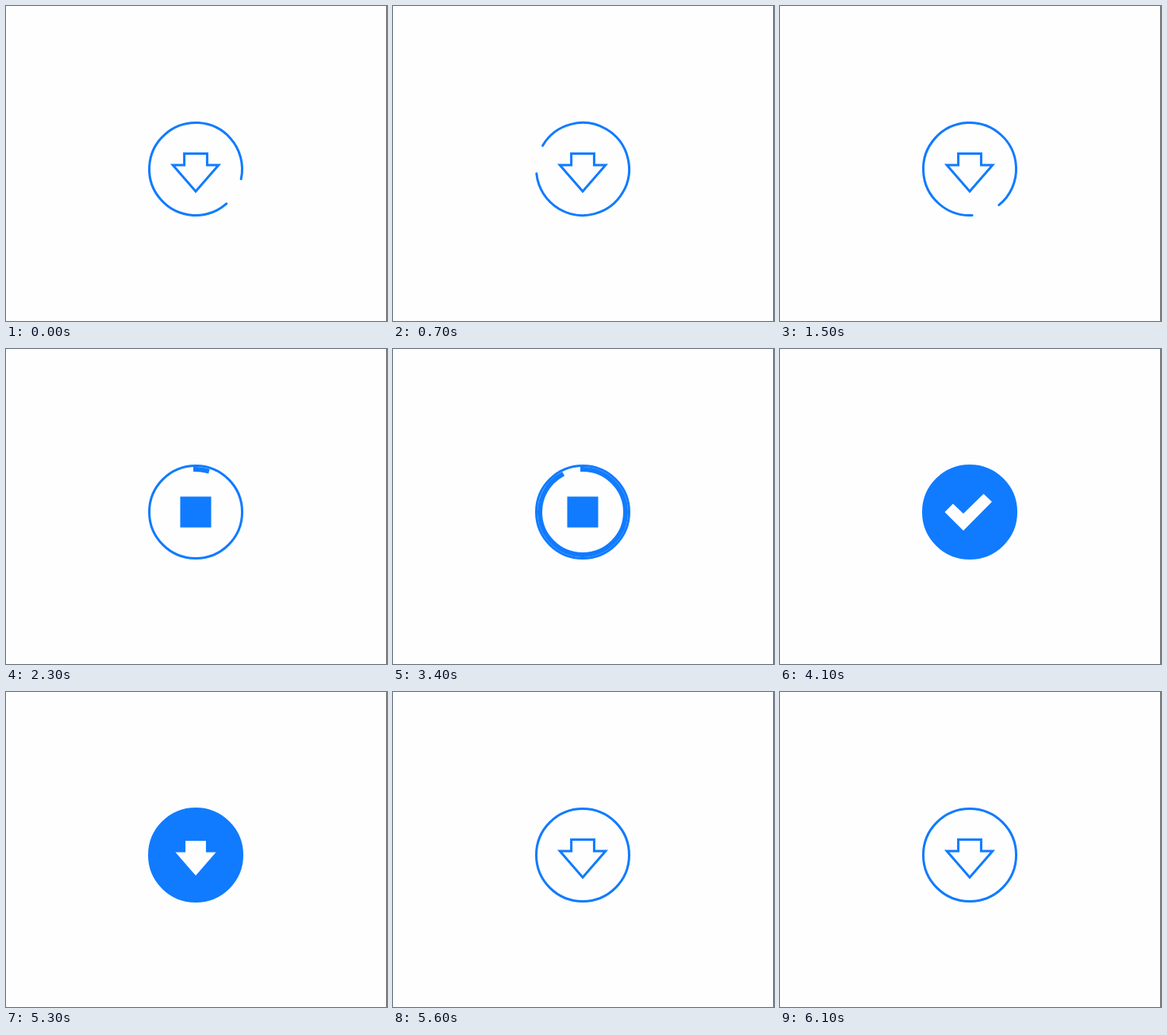
Write an HTML page with a canvas that moves like this. It is 480 px wide and 398 px high and loops after 6200 ms.

```html
<!DOCTYPE html>
<html lang="en">
<head>
<meta charset="utf-8">
<title>Download button</title>
<style>
  html, body { margin: 0; width: 100%; height: 100%; overflow: hidden; background: #fefefe; }
  canvas { display: block; }
</style>
</head>
<body>
<canvas id="stage" width="480" height="398"></canvas>
<script>
const LOOP = 6200, STEP = 100;
const RGB = '16,123,255', BLUE = `rgb(${RGB})`, WHITE = '#fefefe';
const CX = 239, CY = 206, SEG = 14.4;
const ctx = document.getElementById('stage').getContext('2d');
const rad = deg => deg * Math.PI / 180;
const clamp = v => Math.max(0, Math.min(1, v));

const ARROW = [[-1, 0], [1, 0], [1, 1], [2, 1], [0, 3.3], [-2, 1], [-1, 1]]
  .map(([x, y]) => [CX + x * SEG, 186.6 + y * SEG]);
const TICK = [[207.5, 206], [218, 195.5], [231, 208], [256.5, 183], [267, 193], [231, 229.5]];

function polygon(points) {
  ctx.beginPath();
  points.forEach(([x, y]) => ctx.lineTo(x, y));
  ctx.closePath();
}

function arc(radius, from, to, width, cap) {
  ctx.beginPath();
  ctx.arc(CX, CY, radius, rad(from), rad(to));
  ctx.lineWidth = width;
  ctx.lineCap = cap;
  ctx.stroke();
}

function disc(alpha) {
  ctx.fillStyle = `rgba(${RGB},${alpha})`;
  ctx.beginPath();
  ctx.arc(CX, CY, 58.5, 0, rad(360));
  ctx.fill();
}

function arrow(whiteness) {
  polygon(ARROW);
  ctx.fillStyle = `rgba(254,254,254,${whiteness})`;
  ctx.fill();
  ctx.lineWidth = 3;
  ctx.stroke();
}

// Progress arc length in degrees
function sweep(n) {
  if (n < 24) return Math.min(15, 0.1 + 7.5 * (n - 21));
  if (n < 32) return 15 + 34 * (n - 24);
  return n < 35 ? 253 + 25.7 * (n - 31) : 360;
}

function draw(n) {
  ctx.fillStyle = WHITE;
  ctx.fillRect(0, 0, 480, 398);
  ctx.fillStyle = '#5c5c5c';
  ctx.fillRect(479, 0, 1, 398);
  ctx.strokeStyle = BLUE;

  if (n < 21) { // waiting: the open ring spins
    const gap = 30.4 + n * 522 / 7;
    arc(58.5, gap + 18, gap + 342, 3, 'round');
    arrow(0);
  } else if (n < 53) { // progress, then done
    const done = clamp((n - 35) / 2.5);
    disc(done);
    arc(58.5, 0, 360, 3, 'butt');
    arc(54, -90, -90 + sweep(n), 6, 'square');
    if (n < 35) {
      ctx.fillStyle = BLUE;
      ctx.fillRect(219.5, 186.5, 39, 39);
    } else {
      polygon(TICK);
      ctx.fillStyle = BLUE;
      ctx.fill();
      ctx.fillStyle = `rgba(254,254,254,${clamp(done * 2)})`;
      ctx.fill();
    }
  } else { // reset: the disc fades out
    const left = 1 - clamp((n - 53) / 2.6);
    disc(left);
    arc(58.5, 0, 360, 3, 'butt');
    arrow(left);
  }
}

function tick() {
  draw(Math.floor(performance.now() % LOOP / STEP));
  requestAnimationFrame(tick);
}
tick();
</script>
</body>
</html>
```
